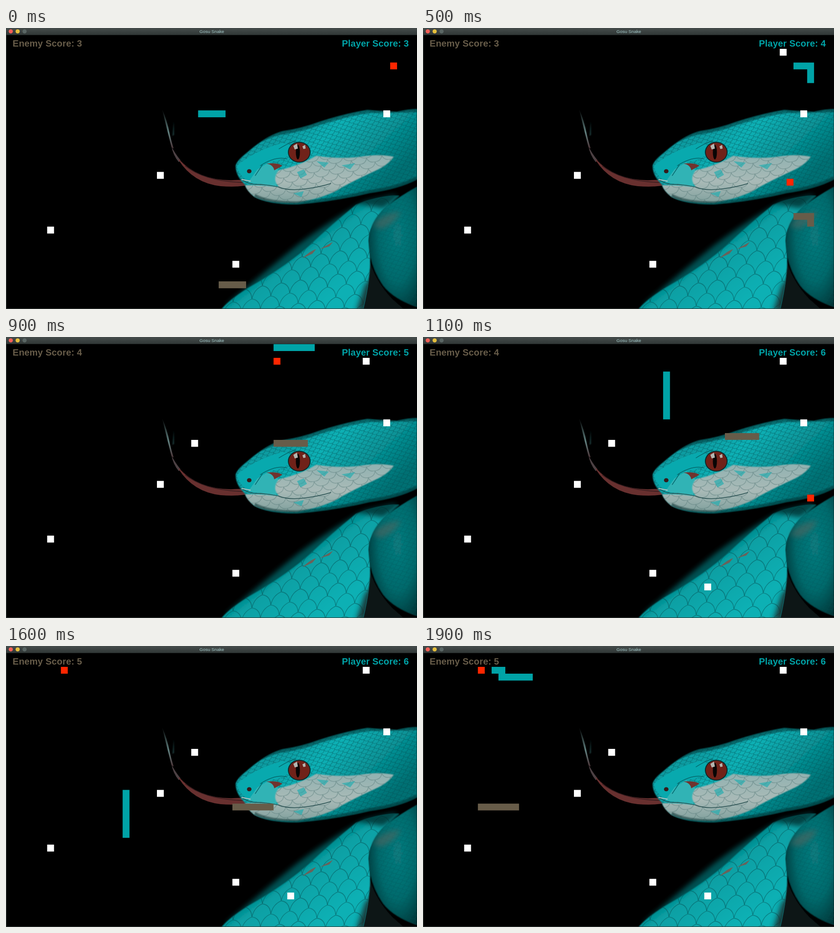
An HTML page that plays this animation: 904 by 620 pixels, repeating every 2 s.

```html
<!DOCTYPE html>
<html lang="en">
<head>
<meta charset="utf-8">
<title>Gosu Snake</title>
<style>
  html, body { margin: 0; width: 100%; height: 100%; overflow: hidden; background: #000; }
  svg { display: block; width: 904px; height: 620px; }
  text { font-family: "Liberation Sans", Arial, sans-serif; }
  .score { font-size: 20.1px; font-weight: bold; font-kerning: none; letter-spacing: .14px; }
</style>
</head>
<body>
<svg viewBox="0 0 904 620">
  <defs>
    <linearGradient id="bar" x2="0" y2="1">
      <stop stop-color="#454c4b"/><stop offset="1" stop-color="#303736"/>
    </linearGradient>
    <linearGradient id="headTone" gradientUnits="userSpaceOnUse" x1="640" y1="205" x2="800" y2="375">
      <stop stop-color="#079ca1"/><stop offset=".3" stop-color="#08b0b5"/>
      <stop offset=".65" stop-color="#079498"/><stop offset="1" stop-color="#057073"/>
    </linearGradient>
    <linearGradient id="jawTone" x2="0" y2="1">
      <stop stop-color="#91b2b1"/><stop offset=".55" stop-color="#a9bab7"/><stop offset="1" stop-color="#81a19e"/>
    </linearGradient>
    <linearGradient id="bodyTone" gradientUnits="userSpaceOnUse" x1="610" y1="465" x2="710" y2="600">
      <stop stop-color="#056466"/><stop offset=".35" stop-color="#07a0a4"/><stop offset="1" stop-color="#08b0b4"/>
    </linearGradient>
    <radialGradient id="coilTone" cx=".6" cy=".4" r=".7">
      <stop stop-color="#077c7f"/><stop offset=".55" stop-color="#066a6c"/><stop offset="1" stop-color="#033234"/>
    </radialGradient>
    <linearGradient id="tipTone" x2="0" y2="1">
      <stop stop-color="#607f7e" stop-opacity="0"/><stop offset=".6" stop-color="#607f7e"/><stop offset="1" stop-color="#4a3336"/>
    </linearGradient>
    <pattern id="smallScales" width="15" height="12" patternUnits="userSpaceOnUse" patternTransform="rotate(-22)">
      <path d="M0 0Q1 6 7.5 6Q14 6 15 0M-7.5 6Q-6.5 12 0 12Q6.5 12 7.5 6Q8.5 12 15 12" fill="none" stroke="#034f53" stroke-width="1.2"/>
    </pattern>
    <pattern id="lipScales" width="34" height="24" patternUnits="userSpaceOnUse" patternTransform="rotate(-10)">
      <path d="M0 0Q3 12 17 12Q31 12 34 0M-17 12Q-14 24 0 24Q14 24 17 12Q20 24 34 24" fill="none" stroke="#587b7a" stroke-width="1.3"/>
    </pattern>
    <pattern id="bodyScales" width="42" height="50" patternUnits="userSpaceOnUse" patternTransform="rotate(-9) skewX(-14)">
      <path d="M0 0Q18 5 21 25Q24 5 42 0M0 50Q3 30 21 25Q39 30 42 50" fill="none" stroke="#034447" stroke-width="1.2"/>
    </pattern>
    <filter id="soft" x="-20%" y="-20%" width="140%" height="140%"><feGaussianBlur stdDeviation="6"/></filter>
    <filter id="edge"><feGaussianBlur stdDeviation="1"/></filter>
    <path id="head" d="M505 304Q507 293 530 275Q572 238 608 228Q650 222 690 207Q745 189 795 181Q830 184 860 185Q885 179 904 179V334Q865 355 800 364Q720 383 640 389Q575 389 546 372Q530 358 525 345Q505 326 505 304Z"/>
    <path id="jaw" d="M526 347Q560 346 590 350L600 350Q584 334 600 314Q650 302 682 282Q735 290 780 284Q820 277 853 284Q840 303 810 316Q765 337 738 352Q710 372 640 386Q575 387 546 372Q530 360 526 347Z"/>
    <path id="body" d="M474 620Q490 600 535 572Q610 530 665 482Q720 430 770 390Q820 371 865 370Q800 420 798 470Q808 520 785 620Z"/>
    <path id="coil" d="M904 350Q867 371 840 391Q803 420 798 465Q796 520 829 568Q852 598 904 616Z"/>
    <clipPath id="inHead"><use href="#head"/></clipPath>
    <clipPath id="inBody"><use href="#body"/></clipPath>
  </defs>

  <rect width="904" height="620"/>

  <!-- dimmed coils behind -->
  <path d="M482 614Q560 545 640 480Q720 420 790 383L860 368L790 450L620 580Z" fill="#045153" filter="url(#soft)"/>
  <g filter="url(#edge)">
    <path d="M770 620Q790 570 799 510Q812 558 850 598L875 620Z" fill="#091414"/>
    <use href="#body" fill="url(#bodyTone)"/>
  </g>
  <use href="#body" fill="url(#bodyScales)" opacity=".6"/>
  <g clip-path="url(#inBody)">
    <path d="M760 385Q820 362 880 362L830 398Z" fill="#022a2c" opacity=".8" filter="url(#soft)"/>
    <path d="M770 625L790 565L815 545V625Z" fill="#1c2b29" opacity=".85" filter="url(#soft)"/>
  </g>
  <path d="M652 508Q670 491 682 488L674 498ZM690 488L719 472L711 482Z" fill="#6a625a"/>
  <use href="#coil" fill="url(#coilTone)" filter="url(#edge)"/>
  <use href="#coil" fill="url(#smallScales)" opacity=".3"/>
  <path d="M808 438Q820 410 868 405Q858 430 827 443Z" fill="#59645d" opacity=".55" filter="url(#soft)"/>

  <!-- tongue -->
  <g fill="#68302f">
    <path d="M343 178Q355 205 360 233Q365 255 369 266L364 263Q357 236 343 178Z" fill="url(#tipTone)"/>
    <path d="M369 206L370 236L366 238Z" fill="#193232" filter="url(#edge)"/>
    <path d="M364 261Q371 276 384 292L380 296Q367 280 364 261Z" fill="#4c4043"/>
    <path d="M380 289Q421 335 495 336Q520 334 538 338L537 346Q510 352 472 349Q412 342 380 292Z"/>
    <path d="M394 304Q440 341 534 341" fill="none" stroke="#30191c" stroke-width="1.3"/>
  </g>

  <!-- head -->
  <use href="#head" fill="url(#headTone)" filter="url(#edge)"/>
  <use href="#head" fill="url(#smallScales)" opacity=".48"/>
  <path d="M508 304Q545 272 600 256Q635 247 622 280Q610 292 578 296Q550 310 552 342Q514 336 508 304Z" fill="#08a9ae"/>
  <path d="M553 312L579 296L601 316L594 349Q552 345 533 340Z" fill="#31b3b5"/>
  <use href="#jaw" fill="url(#jawTone)" filter="url(#edge)"/>
  <use href="#jaw" fill="url(#lipScales)" opacity=".6"/>
  <path d="M640 318L655 312L662 324L648 332ZM683 294L710 297L700 308ZM738 303L768 298L757 312ZM632 365L655 360L650 373Z" fill="#20adb0" opacity=".65"/>
  <g clip-path="url(#inHead)" fill="none" stroke="#012c2e" filter="url(#edge)">
    <path d="M560 244Q590 230 608 228Q650 222 690 207Q745 189 795 181L904 179" stroke-width="14" opacity=".5"/>
    <path d="M546 372Q575 389 640 389Q720 383 800 364Q865 355 904 334" stroke-width="13" opacity=".5"/>
  </g>
  <path d="M517 333Q534 347 560 345Q582 347 600 351Q622 360 658 355Q690 351 715 343" fill="none" stroke="#284f50" stroke-width="1.6"/>
  <path d="M518 334L538 338" stroke="#b5c9c6" stroke-width="2"/>
  <path d="M573 299Q598 297 608 304L590 314Q588 302 573 299Z" fill="#70332f"/>
  <ellipse cx="535" cy="316" rx="5" ry="4.5" fill="#351b1b"/>
  <path d="M559 304Q593 282 619 289M548 326L564 302M600 267Q622 253 638 249" fill="none" stroke="#04666a" stroke-width="1.4"/>
  <ellipse cx="645" cy="274" rx="25" ry="23" fill="#082b2d"/>
  <ellipse cx="645" cy="274" rx="23" ry="21" fill="#702219"/>
  <ellipse cx="642" cy="274" rx="4.5" ry="16" fill="#080505"/>
  <path d="M632 260L640 255L642 266L635 268ZM652 261L658 258L659 266L654 267Z" fill="#b3b5b0"/>

  <!-- window frame -->
  <rect width="904" height="15.5" fill="url(#bar)"/>
  <path d="M.5 15V619.3H904" fill="none" stroke="#3d4443"/>
  <circle cx="10.5" cy="7.5" r="4.6" fill="#f65f57"/>
  <circle cx="25.6" cy="7.5" r="4.6" fill="#e5bf3c"/>
  <circle cx="40.8" cy="7.5" r="4.6" fill="#5a6664"/>
  <text x="452.7" y="11.3" text-anchor="middle" font-size="9.9" fill="#a9d0d0">Gosu Snake</text>

  <text id="enemyScore" class="score" x="14.6" y="41.2" fill="#675c49"></text>
  <text id="playerScore" class="score" x="738.8" y="41.2" fill="#00a3a7"></text>
  <path id="walls" fill="#fff"/>
  <path id="food" fill="#ff2600"/>
  <path id="enemy" fill="#675c49"/>
  <path id="player" fill="#00a3a7"/>
</svg>
<script>
const CELL = 15.09, TOP = 15.8, LOOP = 2000, FRAME = 100;

// [frame, steps taken]: the game speed varies slightly
const pace = [[0, 0], [3, 21], [7, 46], [11, 75], [14, 99], [16, 115], [19, 140]];

// Corners of each route, starting at the tail; meals are step counts
const snakes = {
  player: {
    label: 'Player',
    meals: [32, 52, 63],
    route: [[28, 11], [38, 11], [38, 8], [52, 8], [52, 4], [56, 4], [56, 8], [50, 8], [50, 0],
            [39, 0], [39, 2], [35, 2], [35, 26], [17, 26], [17, 3], [11, 3], [11, 2], [10, 2]],
  },
  enemy: {
    label: 'Enemy',
    meals: [40, 92],
    route: [[31, 36], [56, 36], [56, 26], [53, 26], [53, 21], [48, 21], [48, 14],
            [37, 14], [37, 13], [56, 13], [56, 22], [8, 22]],
  },
};

// [first step, column, row]
const foods = [[0, 56, 4], [32, 53, 21], [40, 48, 0], [52, 39, 2], [63, 56, 22], [92, 8, 2]];
const walls = [[0, 6, 28], [0, 22, 20], [0, 33, 33], [0, 55, 11], [32, 52, 2], [52, 27, 14], [63, 41, 35]];

function walk(route) {
  const cells = [route[0]];
  for (const [col, row] of route.slice(1)) {
    let [x, y] = cells.at(-1);
    while (x !== col || y !== row) {
      x += Math.sign(col - x);
      y += Math.sign(row - y);
      cells.push([x, y]);
    }
  }
  return cells;
}

function stepsAt(frame) {
  const i = pace.findIndex(([f]) => f >= frame);
  if (i === 0) return 0;
  const [f0, s0] = pace[i - 1], [f1, s1] = pace[i];
  return Math.round(s0 + (s1 - s0) * (frame - f0) / (f1 - f0));
}

function drawCells(id, cells) {
  const d = cells.map(([col, row]) =>
    `M${col * CELL} ${TOP + row * CELL}h${CELL}v${CELL}h${-CELL}z`);
  document.getElementById(id).setAttribute('d', d.join(''));
}

for (const snake of Object.values(snakes)) snake.cells = walk(snake.route);

function draw(frame) {
  const step = stepsAt(frame);
  const present = list => list.filter(([start]) => start <= step).map(([, col, row]) => [col, row]);

  drawCells('walls', present(walls));
  drawCells('food', present(foods).slice(-1));
  for (const [id, { label, meals, cells }] of Object.entries(snakes)) {
    const eaten = meals.filter(meal => meal <= step).length;
    const head = step + 3;
    drawCells(id, cells.slice(head - 3 - eaten, head + 1));
    document.getElementById(id + 'Score').textContent = `${label} Score: ${3 + eaten}`;
  }
}

const start = performance.now();
function tick() {
  draw(Math.floor((performance.now() - start) % LOOP / FRAME));
  requestAnimationFrame(tick);
}
tick();
</script>
</body>
</html>
```
